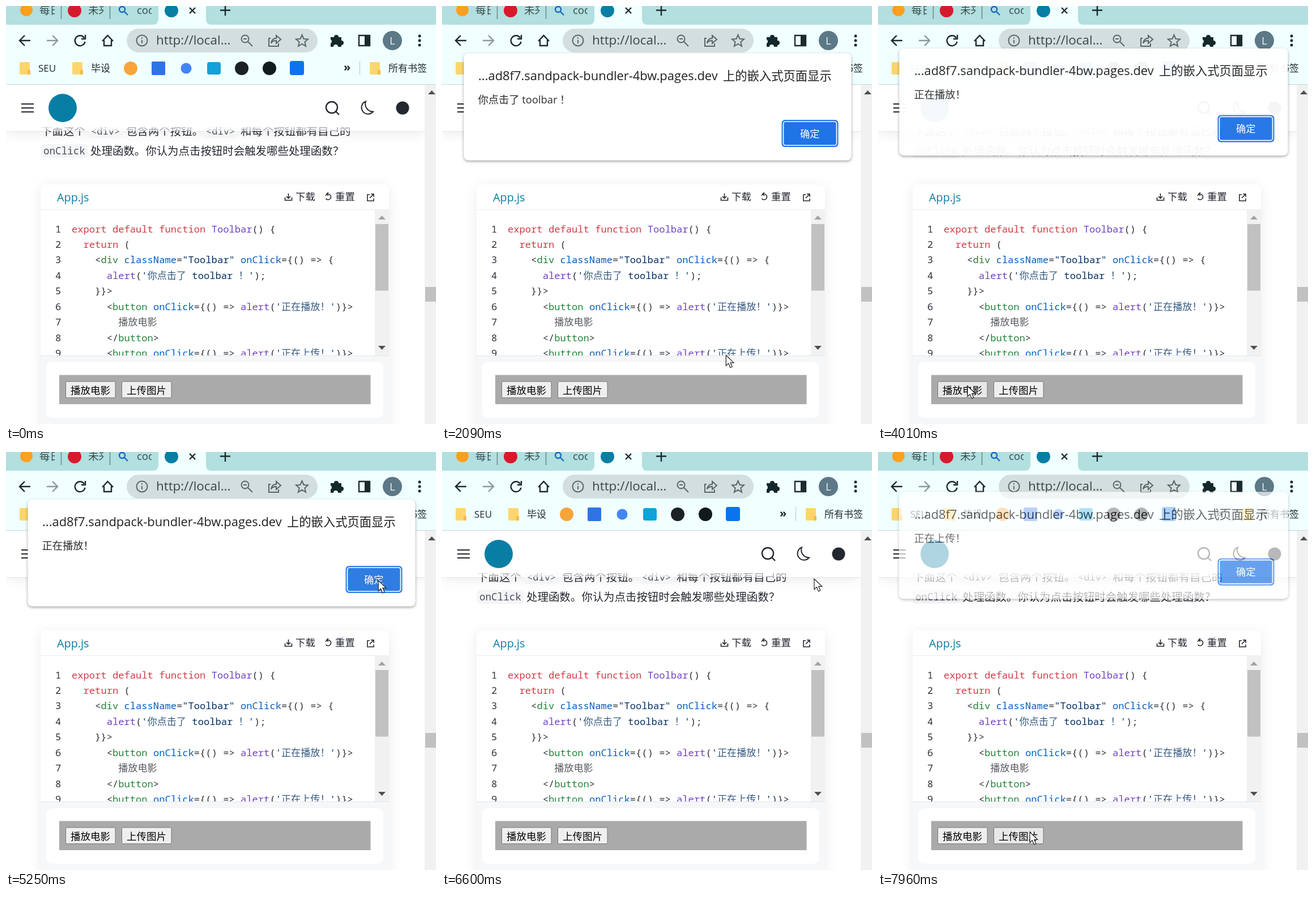
Recreate the animation shown at these times as an HTML page. Size 759 px wide and 738 px high, loop 8 s.

```html
<!DOCTYPE html>
<html lang="zh-CN">
<head>
<meta charset="utf-8">
<title>事件传播</title>
<style>
html, body { margin: 0; width: 100%; height: 100%; overflow: hidden; background: #fff; }
svg { display: block; width: 100%; height: 100%; }
text { font-family: "Open Sans", "Noto Sans CJK SC", "Noto Sans CJK", sans-serif; white-space: pre; fill: #23272f; }
.mono { font-family: "Noto Sans Mono", "Noto Sans CJK SC", "Noto Sans CJK", monospace; font-size: 17.14px; }
.code { fill: #2d3238; }
.inline { fill: #4a505a; font-weight: 300; }
.cjk { font-weight: 300; fill-opacity: .8; }
.key { fill: #d13b47; }
.tag { fill: #22863a; }
.attr { fill: #005cc5; }
.def { fill: #6f42c1; }
.str { fill: #032f62; }
.line { fill: none; stroke-width: 2.4; }
.chip { fill: #f4f5f7; }
.body { font-size: 19.45px; }
.chrome { font-size: 17px; fill: #1b2a2c; }
.tab { font-size: 18.5px; fill: #3b4b4d; }
.play { fill: #efefef; stroke: #767676; }
.soft { filter: drop-shadow(0 4px 11px rgba(0, 0, 0, .08)); }
.box { filter: drop-shadow(0 2px 2.5px rgba(0, 0, 0, .36)); }
</style>
</head>
<body>
<svg viewBox="0 0 759 738" preserveAspectRatio="none">
<defs>
  <clipPath id="editor"><path d="M61 360h590v257H61z"/></clipPath>
  <clipPath id="titles"><path d="M58 0h28v30H58zM144 0h28v30h-28zM230 0h27v30h-27z"/></clipPath>
  <g id="folder"><path d="M0 2q0-2 2-2h14q2 0 2 2v12h1v8H2q-2 0-2-2z" fill="#fcd66c"/><path d="M14 22v-8h5v8z" fill="#f3bd45"/></g>
</defs>
<rect width="759" height="738" fill="#fff"/>

<!-- site header -->
<path class="soft" d="M0 139h739v82H0z" fill="#fff"/>
<path d="M0 221.5h739" stroke="#e4e5e8"/>

<!-- article -->
<g class="body">
  <rect class="chip" x="145" y="209" width="61" height="24" rx="6"/>
  <rect class="chip" x="348" y="209" width="62" height="24" rx="6"/>
  <rect class="chip" x="61" y="244" width="84" height="24" rx="6"/>
  <text x="62" y="228">下面这个</text><text x="212" y="228">包含两个按钮。</text><text x="414" y="228">和每个按钮都有自己的</text>
  <text class="mono inline" x="150" y="227">&lt;div&gt;</text><text class="mono inline" x="353" y="227">&lt;div&gt;</text>
  <text class="mono inline" x="66" y="262" style="font-size:17.6px">onClick</text>
  <text x="149" y="263">处理函数。你认为点击按钮时会触发哪些处理函数？</text>
</g>
<path d="M0 139h739v75H0z" fill="#fff"/>
<path d="M0 214h739v7H0z" fill="#fff" opacity=".6"/>
<g class="line" stroke="#23272f">
  <path d="M27 173h22M27 180h22M27 187h22" stroke-width="2"/>
  <circle cx="575" cy="179" r="10"/><path d="M582 186l6 6"/>
  <path d="M635 168.500a11.500 11.500 0 1 0 13 18a13.500 13.500 0 0 1-13-18z" stroke-width="2"/>
</g>
<circle cx="100" cy="180" r="25" fill="#087ea4"/>
<circle cx="700" cy="180" r="11.5" fill="#23272f"/>

<!-- browser chrome -->
<path d="M0 0h759v138H0z" fill="#f0ffff"/>
<path d="M0 0h269v23q0 10-10 10H0zM353 0h406v33H363q-10 0-10-10z" fill="#b2dfdf"/>
<path d="M0 138.500h759" stroke="#c9d6d6"/>
<circle cx="36" cy="7" r="11" fill="#fb9f1f"/>
<circle cx="121" cy="8" r="12" fill="#d71a2b"/>
<circle cx="292" cy="8" r="12" fill="#087ea4"/>
<path d="M97.500 0v23M183.500 0v23" stroke="#6d8888" stroke-width="1.5"/>
<g class="line" stroke="#1769c2"><circle cx="205" cy="6" r="5"/><path d="M209 10l6 6"/></g>
<g clip-path="url(#titles)"><text class="tab" x="59" y="14">每日</text><text class="tab" x="145" y="14">未来</text><text class="tab" x="231" y="14">code</text></g>
<g class="line" stroke="#1b2a2c"><path d="M324 3l10 10M334 3l-10 10M387 -2v19M378 7.500h18"/></g>

<rect x="213" y="40" width="337" height="42" rx="21" fill="#d3dfdf"/>
<text x="265" y="68" font-size="22.4" style="fill:#3b4648">http://local...</text>
<g class="line" stroke="#1b2a2c">
  <path d="M43 61H25M33 52l-9 9 9 9"/>
  <path d="M72 61h18M82 52l9 9-9 9" stroke="#899b9b"/>
  <path d="M138 56a9 9 0 1 0 1.500 7M140 51v7h-7"/>
  <path d="M170 62l9.500-10 9.500 10M173 60v10h13V60"/>
  <path d="M623 52h19v18h-19z"/><path d="M637 52v18" stroke-width="8"/>
</g>
<g class="line" stroke="#5a6767" style="stroke-width:2">
  <circle cx="240" cy="61" r="9.500"/><path d="M240 60v6M240 55.500v2"/>
  <circle cx="422" cy="58" r="6.500"/><path d="M427 63l8 8M419 58h6"/>
  <path d="M467 57h-3v14h17v-5M468 66q1-9 9-9v-5l8 7-8 7v-5q-6 0-9 4z"/>
  <path d="M522.500 51l3 7 7.500.600-5.700 5 1.800 7.400-6.600-4-6.600 4 1.800-7.400-5.700-5 7.500-.600z"/>
</g>
<path d="M573 55h6a4 4 0 1 1 8 0h5v6a4 4 0 1 1 0 8v3h-6a4 4 0 0 0-8 0h-5v-6a4 4 0 0 0 0-7z" fill="#12282b"/>
<circle cx="682" cy="61" r="17" fill="#5d7886"/>
<text x="677" y="68" font-size="19" style="fill:#e8f2f4">L</text>
<g fill="#1b2a2c"><circle cx="730" cy="53" r="2.500"/><circle cx="730" cy="61" r="2.500"/><circle cx="730" cy="69" r="2.500"/></g>

<use href="#folder" x="24" y="99"/><use href="#folder" x="117" y="99"/><use href="#folder" x="642" y="99"/>
<text class="chrome" x="57" y="116">SEU</text><text class="chrome" x="150" y="116">毕设</text>
<text class="chrome" x="596" y="115" font-weight="700" style="font-size:20px">»</text><text class="chrome" x="675" y="116">所有书签</text>
<path d="M624.500 97v25" stroke="#b5cccc"/>
<circle cx="220" cy="110" r="12" fill="#f9a43a"/>
<rect x="257" y="98" width="24" height="24" rx="2" fill="#2f73e4"/>
<circle cx="318" cy="110" r="9.500" fill="#4285f4"/>
<rect x="355" y="99" width="24" height="22" rx="4" fill="#12a1d8"/>
<circle cx="416" cy="110" r="12" fill="#1b2125"/>
<circle cx="465" cy="110" r="12" fill="#111b1d"/>
<rect x="501" y="97" width="25" height="25" rx="4" fill="#0a74ee"/>

<!-- sandbox card -->
<path class="soft" d="M61 760V325q0-10 10-10h595q10 0 10 10v435z" fill="#fff"/>
<path d="M61 359.500h615" stroke="#ebecef"/>
<text x="90" y="345" font-size="19.8" font-weight="500" style="fill:#087ea4">App.js</text>
<text x="511" y="343" font-size="17.4">下载</text><text x="581" y="343" font-size="17.4">重置</text>
<g class="line" stroke="#23272f" style="stroke-width:1.6">
  <path d="M498.500 331v8M495 336l3.500 3.500 3.500-3.500M492.500 338v5h12v-5"/>
  <path d="M564 335a5 5 0 1 1 .500 5M569 329l-3 3 3 3"/>
  <path d="M642 333h-4v11h11v-4M644 332h5v5M649 332l-7 7"/>
</g>
<g id="code" clip-path="url(#editor)"></g>
<path d="M651 360h25v257h-25zM739 139h20v599h-20z" fill="#f1f1f1"/>
<path d="M652 385h23v117.500h-23zM740 496h19v26h-19z" fill="#c1c1c1"/>
<path d="M657 377l6.500-7 6.500 7z" fill="#a3a3a3"/>
<path d="M657 600l6.500 7 6.500-7zM745 156l6.500-7 6.500 7z" fill="#505050"/>
<path d="M61 617h615v121H61z" fill="#f6f7f9"/>
<path d="M61 617.500h615" stroke="#e3e5e9"/>
<rect x="71" y="629" width="595" height="98" rx="10" fill="#fff"/>
<path d="M94 651.500h549.500v51.500H94z" fill="#a9aaa9"/>
<rect class="play" x="105.500" y="663" width="87.500" height="28.700" rx="2"/>
<rect class="play" x="204.500" y="663" width="87.500" height="28.700" rx="2"/>
<text x="114" y="684.500" font-size="17.500" style="fill:#000">播放电影</text>
<text x="213" y="684.500" font-size="17.500" style="fill:#000">上传图片</text>

<g id="dialogs"></g>
<path id="cursor" d="M0 0V18.500l4.300-4 3.200 7.500 3.400-1.500-3.200-7.200h6z" fill="#fff" stroke="#222" stroke-width="1.200"/>
</svg>
<script>
const LOOP = 8000, STEP = 68.2, FIRST = 390, FADE = 215;
const $ = s => document.querySelector(s);
const clamp = v => Math.max(0, Math.min(1, v));

const source = `export default function Toolbar() {
  return (
    <div className="Toolbar" onClick={() => {
      alert('你点击了 toolbar ！');
    }}>
      <button onClick={() => alert('正在播放！')}>
        播放电影
      </button>
      <button onClick={() => alert('正在上传！')}>`;
const kinds = ['str', 'key', 'attr', 'def', 'tag', 'cjk'];
const tokens = /('[^']*'|"[^"]*")|\b(export|default|function|return)\b|\b(className|onClick)\b|\b(Toolbar|alert)\b|\b(div|button)\b|([\u4e00-\u9fff]+)/g;
const escape = s => s.replace(/</g, '&lt;').replace(/>/g, '&gt;');

function highlight(line) {
  let html = '', last = 0;
  for (const m of line.matchAll(tokens)) {
    const kind = kinds[m.slice(1).findIndex(Boolean)];
    const inner = kind === 'str'
      ? m[0].replace(/[\u4e00-\u9fff！]+/g, '<tspan class="cjk">$&</tspan>') : m[0];
    html += escape(line.slice(last, m.index)) + `<tspan class="${kind}">${inner}</tspan>`;
    last = m.index + m[0].length;
  }
  return html + escape(line.slice(last));
}

$('#code').innerHTML = source.split('\n').map((line, i) => {
  const y = 399.5 + i * 27.45;
  return `<text class="mono code" x="87" y="${y}">${i + 1}</text>
    <text class="mono code" x="116" y="${y}">${highlight(line)}</text>`;
}).join('');

// message, opening time, closing time
const alerts = [
  ['你点击了 toolbar ！', 1469, 2676],
  ['正在播放！', 3863, 5340],
  ['你点击了 toolbar ！', 5370, 6345],
  ['正在上传！', 7860, 9000]
];
$('#dialogs').innerHTML = alerts.map(([message]) => `<g>
  <rect class="box" y="83.5" height="189" rx="8" fill="#fff"/>
  <text x="64" y="131" font-size="21.9" style="fill:#202124">...ad8f7.sandpack-bundler-4bw.pages.dev</text>
  <text x="496" y="131" font-size="21.3" style="fill:#202124">上的嵌入式页面显示</text>
  <text x="63.500" y="172" font-size="18.3" style="fill:#2c2d30">${message}</text>
  <rect class="ok" x="599.500" y="201" width="100" height="48" rx="6"/>
  <rect class="ring" x="602.500" y="204" width="94" height="42" rx="4" fill="none" stroke="#fff" stroke-width="1.700"/>
  <text x="632" y="231.500" font-size="17.300" style="fill:#fff">确定</text></g>`).join('');
const dialogs = [...$('#dialogs').children];
const plays = [...document.querySelectorAll('.play')];

// time, x, y of the pointer tip
const path = [
  [390, 150, 728], [600, 185, 682], [1140, 482, 665], [1280, 495, 678],
  [1830, 495, 678], [1960, 484, 660], [2640, 653, 236], [2780, 653, 236],
  [3470, 158, 671], [4080, 158, 671], [4490, 366, 7], [4880, 620, 358],
  [5300, 660, 217], [5710, 660, 217], [5835, 660, 224], [6050, 660, 224],
  [6118, 657, 224], [6790, 657, 224], [7480, 274, 662], [7620, 268, 671], [8000, 268, 671]
];

function pointer(t) {
  const i = Math.max(1, path.findIndex(p => p[0] >= t));
  const [t0, x0, y0] = path[i - 1], [t1, x1, y1] = path[i];
  const u = clamp((t - t0) / (t1 - t0)), e = u * u * (3 - 2 * u);
  return [x0 + (x1 - x0) * e, y0 + (y1 - y0) * e];
}

function draw(t) {
  const [x, y] = pointer(t);
  const inside = (l, top, r, b) => t >= FIRST && x >= l && x <= r && y >= top && y <= b;
  $('#cursor').setAttribute('transform', `translate(${x} ${y})`);
  $('#cursor').style.display = t < FIRST ? 'none' : '';

  dialogs.forEach((g, i) => {
    const [, open, close] = alerts[i];
    const shown = Math.min(clamp((t - open) / FADE), 1 - clamp((t - close) / FADE));
    const rest = 1 - shown, box = g.querySelector('.box');
    g.style.display = shown ? '' : 'none';
    g.style.opacity = clamp(shown * 1.45);
    g.setAttribute('transform', `translate(0 ${-25 * rest})`);
    box.setAttribute('x', 38.5 - 3 * rest);
    box.setAttribute('width', 684 + 6 * rest);
    g.querySelector('.ring').style.display = t > close ? 'none' : '';
    g.querySelector('.ok').style.fill = inside(600, 201, 699, 249) ? '#2f7de2' : '#1f74e6';
  });
  plays.forEach((b, i) => {
    b.style.fill = inside(105 + 100 * i, 663, 193 + 100 * i, 692) ? '#e8e8e8' : '';
  });
}

const start = performance.now();
function tick() {
  const t = (performance.now() - start) % LOOP;
  const step = Math.floor((t - FIRST + 10) / STEP);
  draw(step < 0 ? 0 : FIRST + step * STEP);
  requestAnimationFrame(tick);
}
tick();
</script>
</body>
</html>
```
